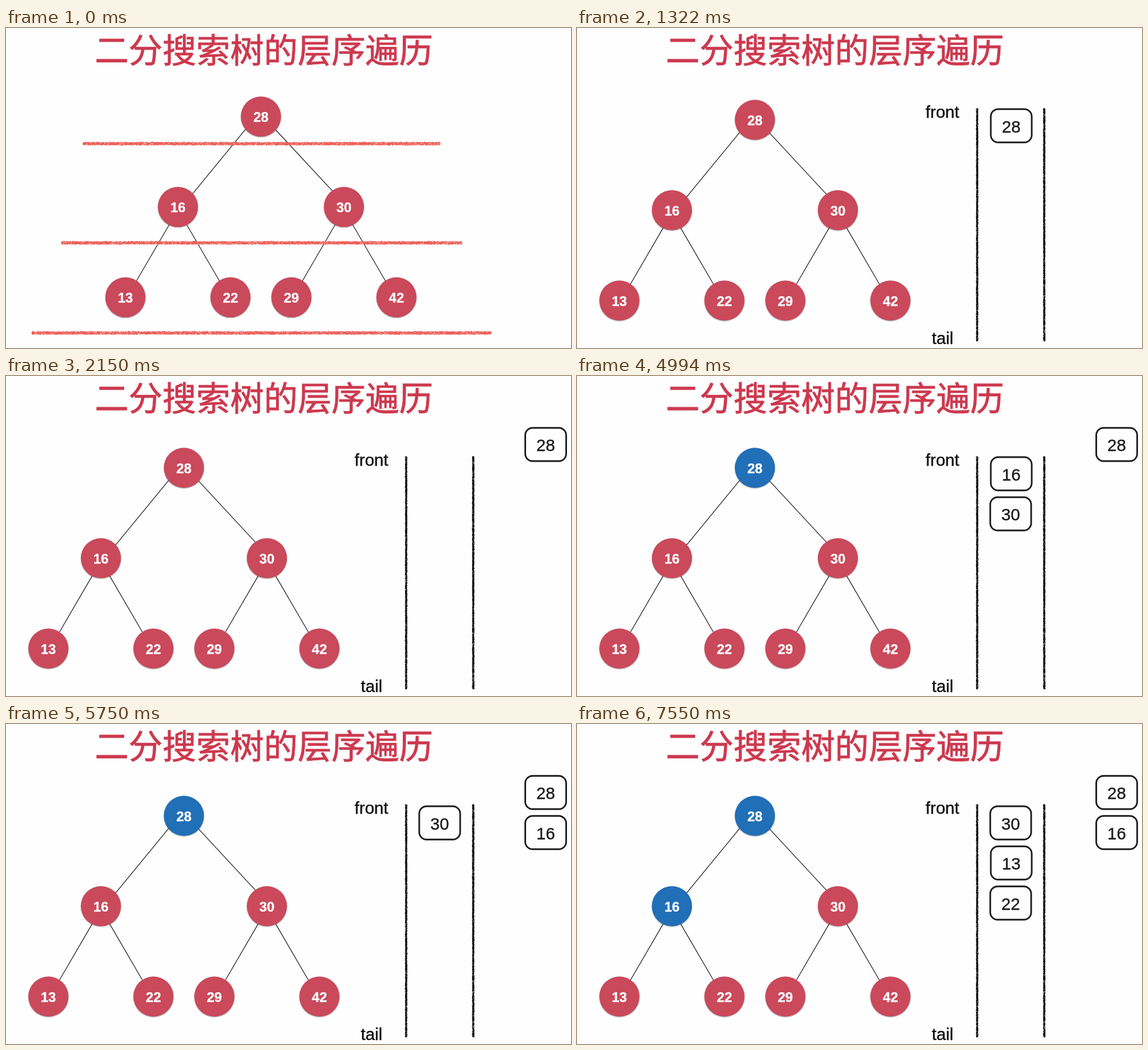
An HTML page with a canvas that plays this animation: 994x563 px, repeating every 8000 ms.

```html
<!DOCTYPE html>
<html lang="zh">
<head>
<meta charset="utf-8">
<style>
html, body { margin: 0; width: 100%; height: 100%; overflow: hidden; background: #fefefe; }
canvas { display: block; }
</style>
</head>
<body>
<canvas id="stage" width="994" height="563"></canvas>
<script>
const ctx = document.getElementById('stage').getContext('2d');
const PAPER = '#fefefe', RED = '#ca495b', BLUE = '#206fb7', INK = '#1c1c1c', CHALK = '#ec6059';
const SANS = '"Liberation Sans", Arial, sans-serif';
const CJK = '"Noto Sans CJK SC", "Noto Sans CJK", sans-serif';
const LOOP = 8000, RADIUS = 35.3, GAP = 70.5;

// The tree in level order: children of i are 2i + 1 and 2i + 2
const values = [28, 16, 30, 13, 22, 29, 42];
const spread = [146, 92.4];
// Where edges meet the circles, sideways from parent and child centre
const rims = [[27, 26], [26, 20.5], [15.5, 19.5]];
// Step 0 shows the levels; then pushes and pops alternate
const stepTimes = [0, 80, 2150, 3860, 5750, 7550];

const parentOf = i => (i - 1) >> 1;
const sideOf = i => i % 2 ? -1 : 1;
const levelOf = i => Math.floor(Math.log2(i + 1));
const nodeX = i => i ? nodeX(parentOf(i)) + sideOf(i) * spread[levelOf(i) - 1] : 313;
const nodeY = i => 161.5 + 159 * levelOf(i);

// A thin outline of the same colour sets the weight of the letters
function text(str, x, y, font, color, weight = 0.4, align = 'center') {
  ctx.font = font;
  ctx.fillStyle = ctx.strokeStyle = color;
  ctx.lineWidth = weight;
  ctx.textAlign = align;
  ctx.fillText(str, x, y);
  ctx.strokeText(str, x, y);
}

function random(seed) {
  return () => (seed = seed * 16807 % 2147483647) / 2147483647;
}

// Ragged band with a few worn spots, drawn from (x, y) at an angle
function chalk(x, y, angle, length, half, color, worn) {
  const rnd = random(1000 + x + y);
  ctx.save();
  ctx.translate(x, y);
  ctx.rotate(angle);
  ctx.fillStyle = color;
  for (let i = 0; i < length; i++) {
    const top = half * (0.65 + 0.5 * rnd()), bottom = half * (0.65 + 0.5 * rnd());
    ctx.fillRect(i, -top, 1.2, top + bottom);
  }
  ctx.fillStyle = PAPER;
  for (let i = 0; i < length * worn; i++) {
    ctx.fillRect(rnd() * length, (rnd() * 2 - 1) * half, 1 + rnd(), 0.7);
  }
  ctx.restore();
}

const levelLine = (half, y) => chalk(449.5 - half, y, 0, half * 2, 3, CHALK, 0.45);
const queueWall = x => chalk(x, 141, Math.PI / 2, 410, 2, '#111', 0.15);

function edge(i) {
  const p = parentOf(i), side = sideOf(i);
  const [from, to] = rims[Math.min(i - 1, 2)];
  const drop = dx => Math.sqrt(35 ** 2 - dx ** 2);
  ctx.strokeStyle = '#111';
  ctx.lineWidth = 1.2;
  ctx.beginPath();
  ctx.moveTo(nodeX(p) + side * from, nodeY(p) + drop(from));
  ctx.lineTo(nodeX(i) - side * to, nodeY(i) - drop(to));
  ctx.stroke();
}

function node(i, color) {
  const x = nodeX(i), y = nodeY(i);
  ctx.save();
  ctx.shadowColor = 'rgba(0,0,0,.4)';
  ctx.shadowBlur = 2;
  ctx.shadowOffsetY = 1;
  ctx.fillStyle = color;
  ctx.beginPath();
  ctx.arc(x, y, RADIUS, 0, Math.PI * 2);
  ctx.fill();
  ctx.restore();
  text(values[i], x, y + 9.5, 'bold 24px ' + SANS, '#fff');
}

function tree(dx, dy, visited) {
  ctx.save();
  ctx.translate(dx, dy);
  for (let i = 1; i < values.length; i++) edge(i);
  values.forEach((_, i) => node(i, i < visited ? BLUE : RED));
  ctx.restore();
}

function box(n, x, y) {
  ctx.strokeStyle = INK;
  ctx.lineWidth = 2.9;
  ctx.beginPath();
  ctx.roundRect(x - 36, y - 29.3, 72, 58.6, 13);
  ctx.stroke();
  text(n, x, y + 11.8, '29.5px ' + SANS, INK);
}

function queue(popped, pushed) {
  const top = popped > 1 ? 174 : 172;
  for (let i = 0; i < pushed; i++) {
    if (i < popped) box(values[i], 949.5, 120.5 + GAP * i);
    else box(values[i], i && sideOf(i) > 0 ? 763 : 764, top + GAP * (i - popped));
  }
}

function draw(step) {
  ctx.fillStyle = PAPER;
  ctx.fillRect(0, 0, 994, 563);
  text('二分搜索树的层序遍历', 453.8, 61, '59.5px ' + CJK, '#cd394e', 0.9);
  if (step === 0) {
    tree(135.5, -5.7, 0);
    levelLine(314.5, 203.5);
    levelLine(352.5, 378);
    levelLine(404.5, 536.5);
    return;
  }
  const popped = step >> 1, visited = (step - 1) >> 1;
  tree(0, 0, visited);
  text('front', 613.3, 158, '29.6px ' + SANS, '#111', 0.4, 'left');
  text('tail', 624.3, 556, '29.6px ' + SANS, '#111', 0.4, 'left');
  queueWall(704);
  queueWall(822);
  queue(popped, 1 + 2 * visited);
}

let shown;
function tick() {
  const t = performance.now() % LOOP;
  const step = stepTimes.findLastIndex(at => at <= t);
  if (step !== shown) draw(shown = step);
  requestAnimationFrame(tick);
}
tick();
</script>
</body>
</html>
```
